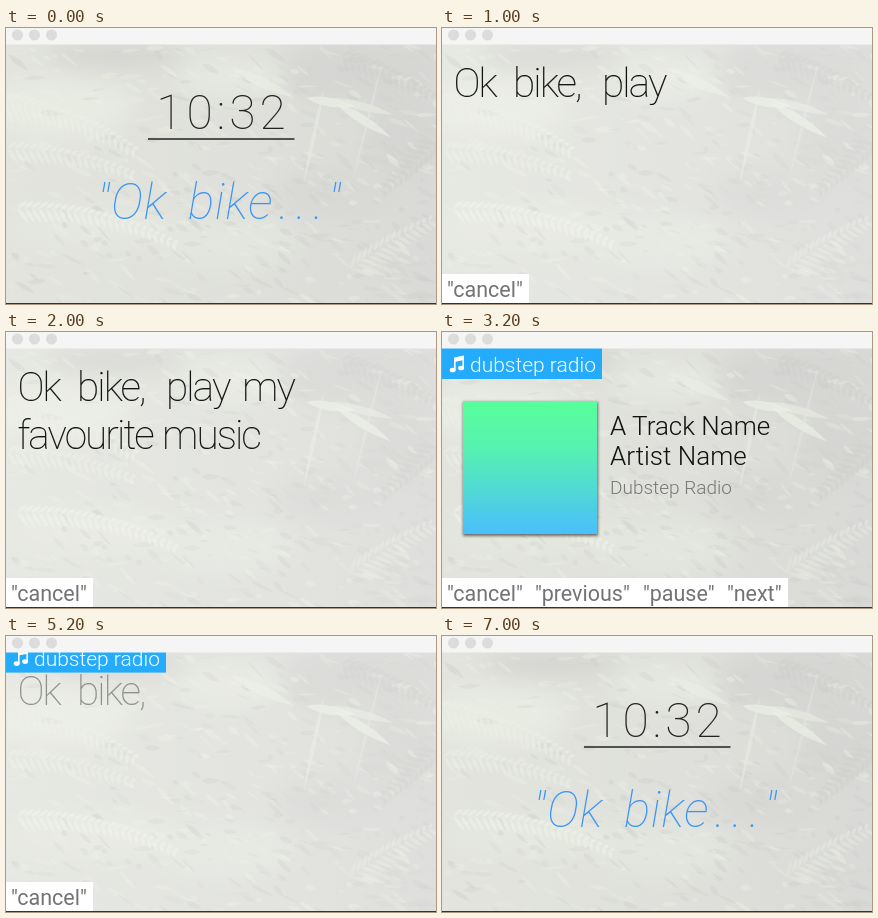
These frames come from a looping animation (430x276 px, 7600 ms). An HTML page:

```html
<!DOCTYPE html>
<html lang="en">
<head>
<meta charset="utf-8">
<style>
  html, body { margin: 0; width: 100%; height: 100%; overflow: hidden; background: #dfe0db; }
  svg { display: block; width: 430px; height: 276px; font-family: Roboto, Inter, "Liberation Sans", sans-serif; font-weight: 300; }
  text { white-space: pre; }
  .thin { font-weight: 100; }
  .speech { font-size: 40.5px; letter-spacing: -1.9px; stroke-width: .15; }
  .command { font-size: 21.5px; font-weight: 400; fill: #737373; }
</style>
</head>
<body>
<svg viewBox="0 0 430 276">
  <defs>
    <linearGradient id="cover" x2="0" y2="1">
      <stop offset="0" stop-color="#58ff9b"/>
      <stop offset=".35" stop-color="#56f2b0"/>
      <stop offset="1" stop-color="#4abffc"/>
    </linearGradient>
    <linearGradient id="haze">
      <stop offset="0" stop-color="#e2e4dd"/>
      <stop offset=".55" stop-color="#dfe0db"/>
      <stop offset="1" stop-color="#d9dad7"/>
    </linearGradient>
    <filter id="soft" x="-50%" y="-50%" width="200%" height="200%"><feGaussianBlur stdDeviation="11"/></filter>
    <filter id="slight"><feGaussianBlur stdDeviation=".7"/></filter>
    <filter id="shadow" x="-10%" y="-10%" width="120%" height="120%"><feGaussianBlur stdDeviation="1.5"/></filter>
  </defs>

  <rect width="430" height="276" fill="url(#haze)"/>
  <g id="blobs" filter="url(#soft)"></g>
  <g id="leaves" filter="url(#slight)"></g>
  <rect id="wash" y="16" width="430" height="259" fill="#fff" opacity=".15"/>

  <g id="home">
    <text class="thin" x="217" y="101" font-size="48" letter-spacing="4" text-anchor="middle" fill="#222">10:32</text>
    <path d="M142 111H288.500" stroke="#222" stroke-width="1.300"/>
    <g class="thin" font-size="49.500" font-style="italic" letter-spacing=".6" fill="#3b95f6">
      <text x="91" y="191">"</text>
      <text x="105" y="191">Ok</text>
      <text x="182" y="191">bike</text>
      <text x="273" y="191" letter-spacing="7">...</text>
      <text x="322" y="191">"</text>
    </g>
  </g>

  <g id="speech" class="thin speech"></g>

  <g id="player">
    <rect x="21" y="70" width="135" height="134" fill="#000" opacity=".55" filter="url(#shadow)"/>
    <rect x="21" y="69" width="134" height="133" fill="url(#cover)"/>
    <g font-size="26" fill="#111">
      <text x="168" y="103">A Track Name</text>
      <text x="168" y="133">Artist Name</text>
      <text x="168" y="162" font-size="19" fill="#777">Dubstep Radio</text>
    </g>
  </g>

  <g id="commands">
    <rect id="strip" y="246" height="29" fill="#fff"/>
    <text class="command" x="5" y="269">"cancel"</text>
    <g id="extra" class="command">
      <text x="93" y="269">"previous"</text>
      <text x="201" y="269">"pause"</text>
      <text x="285" y="269">"next"</text>
    </g>
  </g>

  <g id="station">
    <rect y="16" width="160" height="31" fill="#24abfc"/>
    <g fill="#fff">
      <path d="M12 25.500 22 23.500V36H20.400V28.300L13.600 29.700V38.500H12Z"/>
      <ellipse cx="10.700" cy="38" rx="3" ry="2.300"/>
      <ellipse cx="19.100" cy="36" rx="3" ry="2.300"/>
      <text x="28" y="40" font-size="21">dubstep radio</text>
    </g>
  </g>

  <rect width="430" height="16.500" fill="#f5f5f5"/>
  <g fill="#dcdcdc">
    <circle cx="11.500" cy="7" r="5.500"/>
    <circle cx="28.500" cy="7" r="5.500"/>
    <circle cx="45.500" cy="7" r="5.500"/>
  </g>
  <rect y="275" width="430" height="1" fill="#333"/>
</svg>
<script>
const LOOP = 7600;
const $ = id => document.getElementById(id);

function add(parent, tag, attrs, content = "") {
  const node = document.createElementNS("http://www.w3.org/2000/svg", tag);
  for (const name in attrs) node.setAttribute(name, attrs[name]);
  node.textContent = content;
  parent.append(node);
}

let seed = 7;
const random = () => (seed = seed * 16807 % 2147483647) / 2147483647;

function blob(cx, cy, rx, ry, fill) {
  add($("blobs"), "ellipse", { cx, cy, rx, ry, fill });
}

function leaf(x, y, length, width, degrees, fill, opacity) {
  add($("leaves"), "path", {
    d: `M0 0Q${length * .4} ${-width} ${length} 0Q${length * .4} ${width} 0 0`,
    transform: `translate(${x} ${y}) rotate(${degrees})`, fill, opacity
  });
}

// A curved stem with paired leaflets that shrink towards the tip.
function frond(x, y, length, degrees, size, fill, opacity) {
  const count = Math.round(length / 7);
  for (let i = 0; i < count; i++) {
    const bend = degrees + i * 1.2, angle = bend * Math.PI / 180;
    x += 7 * Math.cos(angle);
    y += 7 * Math.sin(angle);
    const span = size * (1 - .6 * i / count);
    for (const side of [-.6, 1]) leaf(x, y, span * Math.abs(side), 4, bend + side * 58, fill, opacity);
  }
}

function paintForest() {
  const light = "#ebefe5", dark = "#cecfcb";
  blob(110, 28, 70, 14, "#d5d6d1");
  blob(350, 45, 80, 30, "#d5d6d3");
  blob(400, 110, 40, 40, "#d5d6d3");
  blob(330, 165, 60, 25, "#d8d9d5");
  blob(50, 80, 75, 30, "#e8ebe2");
  blob(90, 200, 90, 20, "#e5e8df");
  blob(220, 215, 70, 25, "#e3e6df");
  blob(225, 50, 55, 20, "#e5e8e0");
  for (let i = 0; i < 520; i++) {
    const x = random() * 430, y = 16 + random() * 260;
    const bright = random() < .68 - x / 1100;
    leaf(x, y, 6 + random() * 20, 1.5 + random() * 5, random() * 60 - 10, bright ? light : dark, .2 + random() * .25);
  }
  frond(-10, 70, 150, 8, 26, light, .6);
  frond(5, 180, 165, -2, 20, light, .75);
  frond(-5, 120, 130, 0, 20, light, .55);
  frond(340, 245, 100, -40, 26, "#e4e6df", .6);
  frond(435, 110, 80, 130, 22, dark, .5);
  frond(330, 25, 110, 15, 20, dark, .45);
  leaf(225, 40, 70, 10, 25, light, .6);
  leaf(300, 70, 50, 9, 10, light, .7);
  leaf(330, 75, 65, 9, 32, light, .7);
  leaf(325, 70, 65, 8, 15, light, .5);
  leaf(318, 60, 100, 4, 102, "#e6e8e2", .7);
  leaf(376, 35, 125, 3, 104, "#e3e5e0", .5);
}

// Each word begins at a place set by the word before it.
const START = { "": 11.5, "Ok": 71, "bike,": 160, "play": 236, "pause": 273, "favourite": 156 };

// [time, recognised words, tentative words]; "/" breaks the line.
const HEARD = [
  [500, "", "Ok bike,"],
  [700, "", "Ok bike, play your / music"],
  [800, "Ok bike,", "play your"],
  [1000, "Ok bike, play", ""],
  [1200, "Ok bike, play", "my / favourite"],
  [1300, "Ok bike, play my /", "favourite music"],
  [1900, "Ok bike, play my / favourite", "music"],
  [2000, "Ok bike, play my / favourite music", ""],
  [5100, "", "Ok"],
  [5200, "", "Ok bike,"],
  [5400, "Ok bike,", "pause"],
  [5500, "Ok bike,", "pause more"],
  [5700, "Ok bike,", "pause music"],
  [5900, "Ok bike, pause", "music"]
];

let spoken;
function showSpeech(t) {
  const entry = HEARD.filter(e => e[0] <= t).pop();
  if (entry === spoken) return;
  spoken = entry;
  $("speech").replaceChildren();
  if (!entry) return;
  let previous = "", y = 69;
  entry.slice(1).forEach((phrase, tentative) => {
    const fill = tentative ? "#8b8d8a" : "#0c0c0c";
    for (const word of phrase.split(" ").filter(Boolean)) {
      if (word === "/") {
        previous = "";
        y += 48;
        continue;
      }
      add($("speech"), "text", { x: START[previous], y, fill, stroke: fill }, word);
      previous = word;
    }
  });
}

function show(id, visible) {
  $(id).style.display = visible ? "" : "none";
}

function render(t) {
  const within = (from, to) => t >= from && t < to;
  const listening = within(500, 3200) || within(5100, 7000);
  const playing = within(3200, 4600);

  show("home", !listening && !playing);
  show("wash", listening);
  show("speech", listening);
  show("player", playing);
  show("commands", listening || playing);
  show("extra", playing);
  show("station", within(3200, 7000));
  $("strip").setAttribute("width", playing ? 346 : 87);

  const step = Math.max(0, Math.min(5, Math.floor((t - 5000) / 100)));
  $("station").setAttribute("transform", `translate(0 ${-26 * step / 5})`);
  if (listening) showSpeech(t);
}

paintForest();
const began = performance.now();
function tick() {
  render((performance.now() - began) % LOOP);
  requestAnimationFrame(tick);
}
tick();
</script>
</body>
</html>
```
